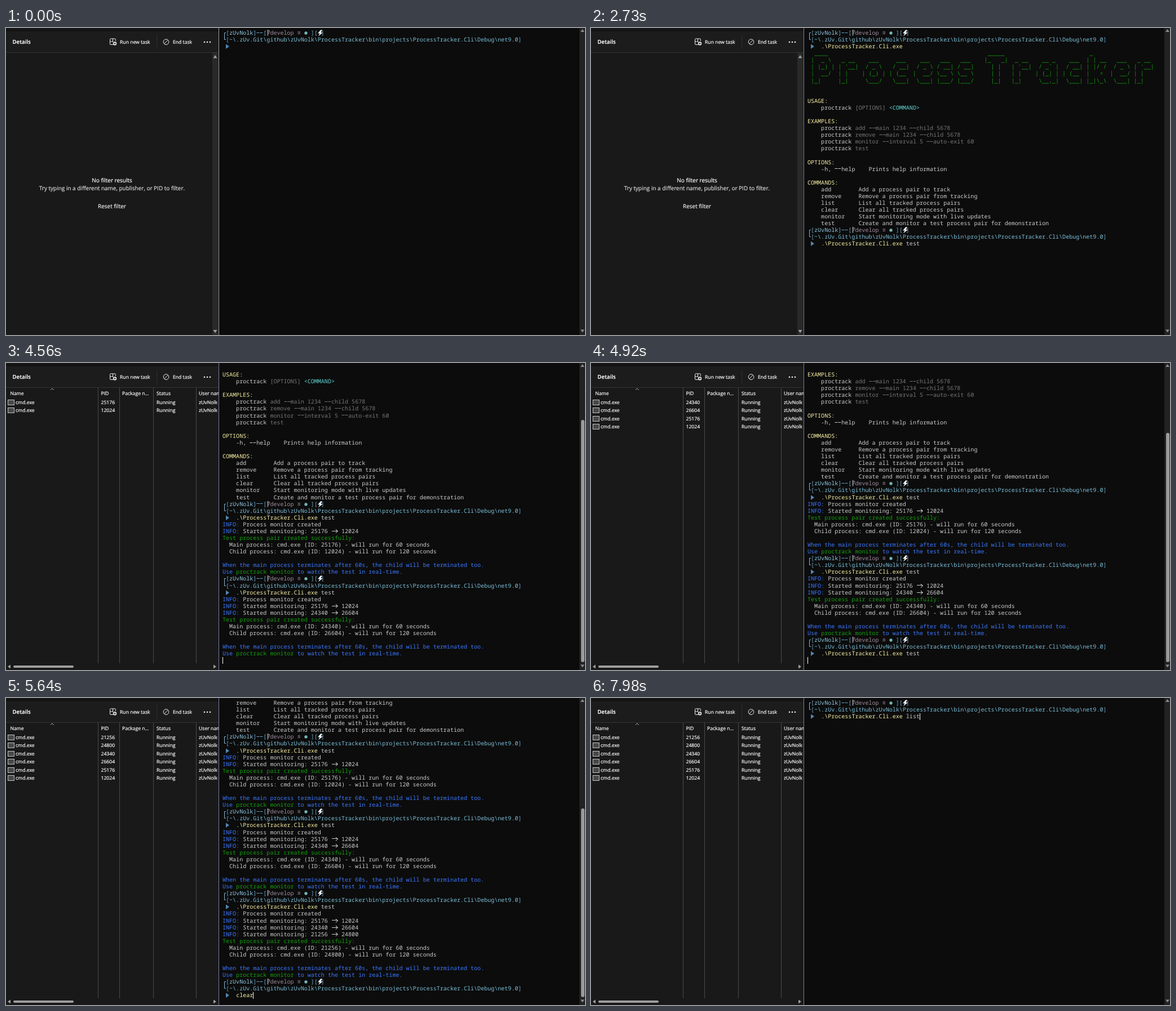
An HTML page that plays this animation: 1027 px wide and 545 px high, repeating every 8 s.

```html
<!DOCTYPE html>
<html lang="en">
<head>
<meta charset="utf-8">
<title>Process tracker demo</title>
<style>
  html, body { margin: 0; width: 100%; height: 100%; overflow: hidden; background: #0c0c0c; }
  body { position: relative; text-rendering: geometricPrecision; }
  div, b, svg { position: absolute; }

  /* task list pane */
  #pane { left: 0; top: 0; width: 377px; height: 545px; overflow: hidden; background: #191919;
    color: #fff; font: 8.65px/14px "Open Sans", "Noto Sans", sans-serif; -webkit-text-stroke: .2px; }
  #pane > svg { left: 0; top: 0; }
  #edge { left: 377px; top: 0; width: 1px; height: 545px; background: #a0a0a0; }
  #edge.focus { background: #7c7ca6; }
  #bar { left: 0; top: 0; width: 377px; height: 43px; background: #1c1c1c; border-bottom: 1px solid #343434; }
  #bar::before { content: ""; position: absolute; width: 377px; height: 6px; background: #141414; }
  .t { position: absolute; left: calc(var(--x) * 1px); top: calc(var(--y) * 1px - 7px); white-space: pre; }
  .mid { left: 0; width: 376px; text-align: center; font-size: 9.97px; }
  #empty, #table { inset: 0; }
  .col { top: 44px; width: 1px; height: 489px; background: #4a4a4a; left: calc(var(--x) * 1px); }
  .row { left: 0; width: 377px; height: 14px; }
  .row b { left: 3px; top: 2px; width: 10px; height: 8px; background: #484848; border: 1px solid #c4c4c4; }

  /* terminal */
  #term { left: 384px; top: 2px; width: 633px; height: 543px; overflow: hidden;
    color: #ccc; font: 10.067px/12.08px "Noto Sans Mono", "DejaVu Sans Mono", monospace; white-space: pre; }
  .line { left: 0; height: 12.08px; }
  .line svg { left: 0; top: 0; overflow: visible; }
  i { font-style: normal; }
  .y { color: #f9f1a5; } .g { color: #13a10e; } .b { color: #3b78ff; }
  .c { color: #61d6d6; } .d { color: #767676; }
  .br { color: #67a3c7; } .nm { color: #8fc6de; } .pt { color: #7cc0da; } .gt { color: #a08c9e; }
  .lig { position: relative; -webkit-text-fill-color: transparent;
    background: linear-gradient(90deg, currentColor 88%, transparent 0) .4px 53% / 50% 1px repeat-x; }
  .to { background: linear-gradient(currentColor 0 0) center 53% / calc(100% - 1.4px) 1px no-repeat; }
  .to::after { content: ""; position: absolute; right: 1.2px; top: 5px; width: 3.6px; height: 3.6px;
    border: solid currentColor; border-width: 1px 1px 0 0; transform: rotate(45deg); }
  #cur { width: 1px; height: 12px; background: #fff; }
  #scroll { left: 1017px; top: 0; width: 10px; height: 545px; background: #222; }
  #thumb { left: 3px; width: 6px; border-radius: 3px; background: #9a9a9a; }
  #scroll svg { left: 0; top: 0; }
</style>
</head>
<body>
<div id="pane">
  <div id="bar"></div>
  <span class="t" style="--x:11.5;--y:25;font-size:9.7px;font-weight:600">Details</span>
  <span class="t" style="--x:202;--y:25">Run new task</span>
  <span class="t" style="--x:296;--y:25">End task</span>
  <svg width="377" height="44" fill="none" stroke="#eee">
    <path d="M190 29.500H186a1.500 1.500 0 0 1-1.500-1.500V20.500a1.500 1.500 0 0 1 1.500-1.500H193a1.500 1.500 0 0 1 1.500 1.500V23M184.500 24H190M189.500 19V25"/>
    <circle cx="193" cy="27.500" r="3.200" fill="#eee" stroke="none"/>
    <path d="M191 27.500h4M193 25.500v4" stroke="#1c1c1c" stroke-width=".9"/>
    <path d="M267.500 12V37" stroke="#303030"/>
    <circle cx="284" cy="24.700" r="4.800"/><path d="M280.700 28 287.300 21.400"/>
    <g fill="#eee" stroke="none"><circle cx="352" cy="25" r="1.300"/><circle cx="357" cy="25" r="1.300"/><circle cx="362" cy="25" r="1.300"/></g>
  </svg>
  <div id="empty">
    <span class="t mid" style="--y:269.500">No filter results</span>
    <span class="t mid" style="--y:284;color:#dcdcdc">Try typing in a different name, publisher, or PID to filter.</span>
    <span class="t mid" style="--y:315.500;color:#f0f0f0">Reset filter</span>
    <svg width="377" height="545" fill="#9e9e9e">
      <path d="M366 44h10v501h-10z" fill="#292929"/>
      <path d="M367.500 53.500h7l-3.500-5.500zM367.500 536h7l-3.500 5.500z"/>
    </svg>
  </div>
  <div id="table">
    <svg width="377" height="545" fill="#9e9e9e">
      <path d="M79 48 82 45 85 48" fill="none" stroke="#aaa"/>
      <path d="M8 535.500v7l-5-3.500zM368 535.500v7l5-3.500z"/>
      <rect x="13" y="537" width="107" height="4" rx="2"/>
    </svg>
    <div id="rows"></div>
  </div>
</div>
<div id="edge"></div>
<div id="term"><div id="lines"></div><div id="cur"></div></div>
<div id="scroll">
  <div id="thumb"></div>
  <svg width="10" height="545" fill="#8a8a8a"><path d="M2 7h7L5.500 2zM2 535.500h7l-3.500 5z"/></svg>
</div>

<script>
const $ = id => document.getElementById(id);
const USER = 'zUvNolk', HOME = '.zUv.Git', EXE = '.\\ProcessTracker.Cli.exe';
const CW = 6.04, LH = 12.08, VIEW = 44, LOOP = 8000;

const esc = s => s.replace(/&/g, '&amp;').replace(/</g, '&lt;')
  .replace(/->/g, '<i class="lig to">-&gt;</i>').replace(/--/g, '<i class="lig">--</i>');
const tint = (cls, s) => `<i class="${cls}">${esc(s)}</i>`;

// figlet banner, letters set at full width
const GLYPHS = {
  P: ['  ____', ' |  _ \\', ' | |_) |', ' |  __/', ' |_|'],
  r: ['', '  _ __', " | '__|", ' | |', ' |_|'],
  o: ['', '   ___', '  / _ \\', ' | (_) |', '  \\___/'],
  c: ['', '   ___', '  / __|', ' | (__', '  \\___|'],
  e: ['', '   ___', '  / _ \\', ' |  __/', '  \\___|'],
  s: ['', '  ___', ' / __|', ' \\__ \\', ' |___/'],
  T: ['  _____', ' |_   _|', '   | |', '   | |', '   |_|'],
  a: ['', '   __ _', '  / _` |', ' | (_| |', '  \\__,_|'],
  k: ['  _', ' | | __', ' | |/ /', ' |   <', ' |_|\\_\\'],
  ' ': ['  ', '', '', '', '']
};
const banner = word => [0, 1, 2, 3, 4].map(row => tint('g', [...word].map(ch => {
  const g = GLYPHS[ch];
  return g[row].padEnd(Math.max(...g.map(s => s.length)));
}).join('')));

const PROMPT = [
  `<svg width="190" height="13"><path d="M6 6.500H3.500V13" fill="none" stroke="#86b6d3"/>
<path d="M80.500 1V11.500" stroke="#d8d8d8"/><path d="M81 3H84L82 8" fill="none" stroke="#a08c9e"/>
<circle cx="148" cy="7" r="2.700" fill="#72b5b5"/>
<path d="M174 1.500 169 7.500H172.500L170 12.500 178 6H174.500L177 1.500Z" fill="#f2f2f2"/></svg>` +
  ' ' + tint('br', '[') + tint('nm', USER) + tint('br', ']--[') + tint('gt', ' develop \u2261   ') +
  tint('br', '][') + ' ' + tint('br', ']'),
  '<svg width="8" height="13"><path d="M3.500 -1V6.500H6" fill="none" stroke="#86b6d3"/></svg> ' + tint('br', '[') +
  tint('pt', `~\\${HOME}\\github\\${USER}\\ProcessTracker\\bin\\projects\\ProcessTracker.Cli\\Debug\\net9.0`) + tint('br', ']')
];
const inputLine = (text, ghost = '') => {
  const [cmd, ...args] = text.split(' ');
  return '<svg width="14" height="13"><path d="M6 2.500 12 6.700 6 11Z" fill="#5288b5"/></svg>    ' +
    tint('y', cmd) + (args.length ? esc(' ' + args.join(' ')) : '') + tint('d', ghost);
};

const example = args => '    proctrack ' + tint('d', args);
const command = (name, about) => '    ' + name.padEnd(11) + about;
const HELP = [
  ...banner('Process Tracker'), '', '',
  tint('y', 'USAGE:'),
  '    proctrack ' + tint('d', '[OPTIONS] ') + tint('c', '<COMMAND>'), '',
  tint('y', 'EXAMPLES:'),
  example('add --main 1234 --child 5678'),
  example('remove --main 1234 --child 5678'),
  example('monitor --interval 5 --auto-exit 60'),
  example('test'), '',
  tint('y', 'OPTIONS:'),
  esc('    -h, --help    Prints help information'), '',
  tint('y', 'COMMANDS:'),
  command('add', 'Add a process pair to track'),
  command('remove', 'Remove a process pair from tracking'),
  command('list', 'List all tracked process pairs'),
  command('clear', 'Clear all tracked process pairs'),
  command('monitor', 'Start monitoring mode with live updates'),
  command('test', 'Create and monitor a test process pair for demonstration')
];

const PAIRS = [[25176, 12024], [24340, 26604], [21256, 24800]];
const info = s => tint('b', 'INFO:') + esc(' ' + s);
const testRun = n => {
  const [main, child] = PAIRS[n - 1];
  return [
    info('Process monitor created'),
    ...PAIRS.slice(0, n).map(p => info(`Started monitoring: ${p[0]} -> ${p[1]}`)),
    tint('g', 'Test process pair created successfully:'),
    `  Main process: cmd.exe (ID: ${main}) - will run for 60 seconds`,
    `  Child process: cmd.exe (ID: ${child}) - will run for 120 seconds`, '',
    tint('b', 'When the main process terminates after 60s, the child will be terminated too.'),
    tint('b', 'Use ') + tint('g', 'proctrack monitor') + tint('b', ' to watch the test in real-time.')
  ];
};
const TEST = EXE + ' test';
const LOG = [...PROMPT, inputLine(EXE), ...HELP];
for (const n of [1, 2, 3]) LOG.push(...PROMPT, inputLine(TEST), ...testRun(n));
LOG.push(...PROMPT, inputLine('clear'));

// end: log lines printed, input: text at the prompt (null while running), pairs: process pairs listed
const typed = (t, input, more) => [t, { input, cur: 1, ghost: '', ...more }];
const run = (t, end) => [t, { end, input: null, cur: 1 }];
const ready = (t, end) => [t, { end, input: '', cur: 1 }];
const blink = t => [t, { cur: 0 }];
const EVENTS = [
  [0, { end: 2, input: '', cur: 0, pairs: 0, ghost: '', focus: false }],
  typed(240, EXE + ' monitor', { focus: true }), blink(420),
  typed(690, EXE + ' '), typed(840, EXE),
  run(1020, 3), run(1170, 8), run(1200, 29), ready(1380, 31), blink(1440),
  typed(1710, EXE), blink(1800),
  typed(2100, EXE + ' ', { ghost: 'monitor' }), typed(2190, EXE + ' t'), typed(2280, EXE + ' te'),
  typed(2370, EXE + ' tes'), typed(2460, TEST), blink(2730),
  run(3000, 32), run(3060, 33), run(3090, 34), run(3120, 40), ready(3150, 42),
  [3480, { pairs: 1 }], blink(3660),
  typed(3990, TEST), blink(4170),
  run(4470, 43), run(4500, 44), run(4530, 46), run(4560, 52), ready(4590, 54),
  typed(4740, TEST), run(4890, 55), [4920, { pairs: 2 }],
  run(4950, 56), run(4980, 59), run(5010, 65), ready(5040, 67),
  [5430, { pairs: 3 }], typed(5490, 'c'),
  typed(5520, 'cl'), typed(5550, 'cle'), typed(5580, 'clea'), typed(5640, 'clear'),
  run(5760, 68), run(5880, 0), ready(5970, 2), blink(6060),
  typed(6330, 'clear'), typed(6480, TEST), blink(6660),
  typed(6960, EXE + ' tes'), typed(7020, EXE + ' te'), typed(7110, EXE + ' t'), typed(7200, EXE + ' '),
  blink(7350), typed(7530, EXE + ' l'), typed(7680, EXE + ' li'), typed(7830, EXE + ' lis'), typed(7980, EXE + ' list')
];
let last = {};
const STATES = EVENTS.map(([t, change]) => last = { ...last, ...change, t });

const cell = (x, s) => `<span class="t" style="--x:${x};--y:7">${s}</span>`;
const COLS = [163, 201, 261, 337];
$('table').insertAdjacentHTML('beforeend',
  COLS.map(x => `<div class="col" style="--x:${x}"></div>`).join('') +
  '<div class="row" style="top:46.5px">' + cell(7.5, 'Name') + cell(168.5, 'PID') +
  cell(206, 'Package n...') + cell(267, 'Status') + cell(342, 'User name') + '</div>');

function drawRows(n) {
  $('empty').style.display = n ? 'none' : '';
  $('table').style.display = n ? '' : 'none';
  $('rows').innerHTML = PAIRS.slice(0, n).reverse().flat().map((pid, i) =>
    `<div class="row" style="top:${63 + i * 14.4}px"><b></b>` + cell(17, 'cmd.exe') + cell(168.5, pid) +
    cell(267, 'Running') + cell(342, USER) + '</div>').join('');
}

function draw(s) {
  const top = Math.max(0, s.end + 1 - VIEW);
  const lines = LOG.slice(top, s.end);
  if (s.input !== null) lines.push(inputLine(s.input, s.ghost));
  $('lines').innerHTML = lines.map((h, i) => `<div class="line" style="top:${i * LH}px">${h}</div>`).join('');

  const col = s.input === null ? 0 : 4 + s.input.length;
  const cur = $('cur').style;
  cur.left = Math.floor(col * CW) + 'px';
  cur.top = Math.round((s.end - top) * LH + .6) + 'px';
  cur.visibility = s.cur ? 'visible' : 'hidden';

  const thumb = $('thumb').style, size = 518 * VIEW / (VIEW + top);
  thumb.display = top ? '' : 'none';
  thumb.top = 531 - size + 'px';
  thumb.height = size + 'px';
  $('edge').classList.toggle('focus', s.focus);
  drawRows(s.pairs);
}

let shown = null;
const start = performance.now();
function tick() {
  const t = (performance.now() - start) % LOOP;
  const state = STATES.findLast(s => s.t <= t);
  if (state !== shown) draw(shown = state);
  requestAnimationFrame(tick);
}
tick();
</script>
</body>
</html>
```
